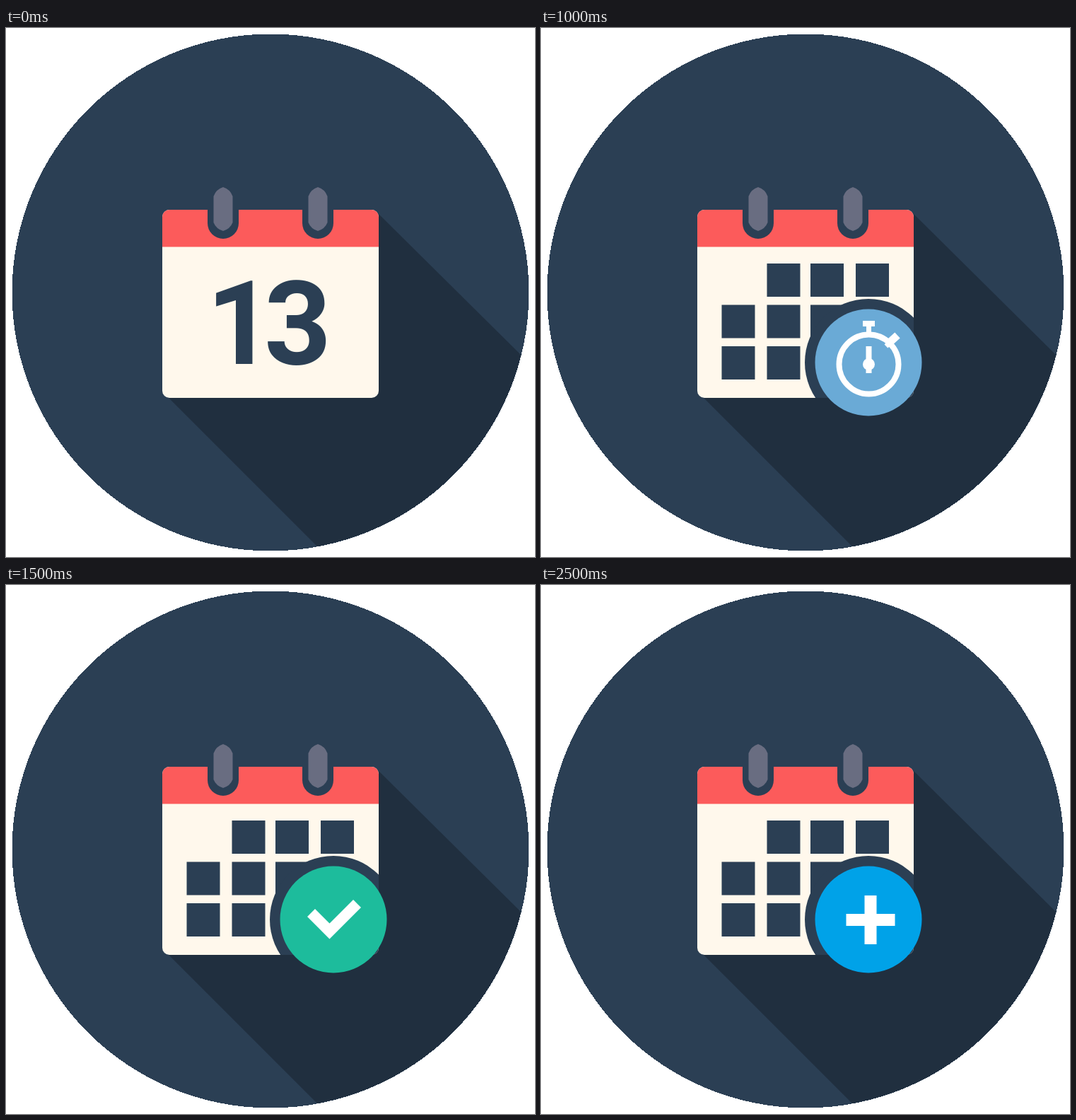
An HTML page for the animation above (3000 ms loop, 748 by 748 pixels).

```html
<!DOCTYPE html>
<html lang="en">
<head>
<meta charset="utf-8">
<title>Calendar icon</title>
<style>
  html, body { margin: 0; width: 100%; height: 100%; overflow: hidden; background: #fff; }
  svg { display: block; width: 748px; height: 748px; }
  .navy { fill: #2b3f54; }
  .line { fill: none; stroke: #fff; }
</style>
</head>
<body>
<svg viewBox="0 0 748 748">
  <defs>
    <clipPath id="disc"><circle cx="374" cy="374" r="365"/></clipPath>
    <clipPath id="page"><rect x="221" y="257" width="306" height="266" rx="10"/></clipPath>
    <g id="hook">
      <path class="navy" d="M-22 250V276a22 22 0 0 0 44 0V250z"/>
      <path d="M-13.5 238Q-10 228 0 225Q10 228 13.5 238V275Q10 284 0 287Q-10 284 -13.5 275z" fill="#696d81"/>
    </g>
  </defs>

  <circle class="navy" cx="374" cy="374" r="365.5" shape-rendering="crispEdges"/>
  <path d="M524 260L748 482V748H455L230 523z" fill="#202f3f" clip-path="url(#disc)"/>

  <g clip-path="url(#page)">
    <rect x="220" y="257" width="308" height="266" fill="#fff8ec"/>
    <rect x="220" y="257" width="308" height="52.5" fill="#fc5b5b"/>
    <text id="date" class="navy" x="283.5 365" y="474.5" font-weight="700" font-size="166" font-family="Roboto, sans-serif">13</text>
    <g id="grid" class="navy"></g>
    <rect id="today" x="390" y="400.5" width="29.5" height="29" fill="#fc5b5b"/>
    <circle id="gap" class="navy" cx="463" cy="473" r="90"/>
  </g>
  <use href="#hook" x="307"/>
  <use href="#hook" x="441"/>

  <g class="badge">
    <circle cx="463" cy="473" r="75.5" fill="#6aaad6"/>
    <circle class="line" cx="463.5" cy="475.5" r="42" stroke-width="8"/>
    <path class="line" d="M455 418H472" stroke-width="8"/>
    <path class="line" d="M463.5 418V432M488 450L497 441" stroke-width="7"/>
    <path class="line" d="M493 444.5L504 434.5" stroke-width="11"/>
    <path class="line" d="M463.5 450V488" stroke-width="8"/>
    <circle cx="463.5" cy="475.5" r="8.5" fill="#fff"/>
  </g>
  <g class="badge">
    <circle cx="463" cy="473" r="75.5" fill="#1dbc9c"/>
    <path class="line" d="M431.5 463.5L457.5 489.5L496.5 450.5" stroke-width="15.5"/>
  </g>
  <g class="badge">
    <circle cx="463" cy="473" r="75.5" fill="#e94b3c"/>
    <path class="line" d="M442 449L490 497M490 449L442 497" stroke-width="16"/>
  </g>
  <g class="badge">
    <circle cx="463" cy="473" r="75.5" fill="#00a2e8"/>
    <path class="line" d="M431.5 473.5H500.5M466 439V508" stroke-width="17"/>
  </g>
</svg>
<script>
  const STEP = 500, STEPS = 6;
  const byId = id => document.getElementById(id);
  const show = (el, on) => el.setAttribute("visibility", on ? "visible" : "hidden");
  const badges = document.querySelectorAll(".badge");

  // Day squares; the first cell of the first week is empty.
  byId("grid").innerHTML = [333, 391.5, 450].map((y, row) =>
    [255.5, 319.5, 381, 445].map((x, col) =>
      row || col ? `<rect x="${x}" y="${y}" width="47" height="47"/>` : "").join("")).join("");

  function draw(now) {
    const step = Math.floor(now / STEP) % STEPS;
    show(byId("date"), step === 0);
    show(byId("grid"), step > 0);
    show(byId("today"), step === 1);
    show(byId("gap"), step > 1);
    badges.forEach((badge, i) => show(badge, step === i + 2));
  }

  const start = performance.now();
  function tick() {
    draw(performance.now() - start);
    requestAnimationFrame(tick);
  }
  tick();
</script>
</body>
</html>
```
